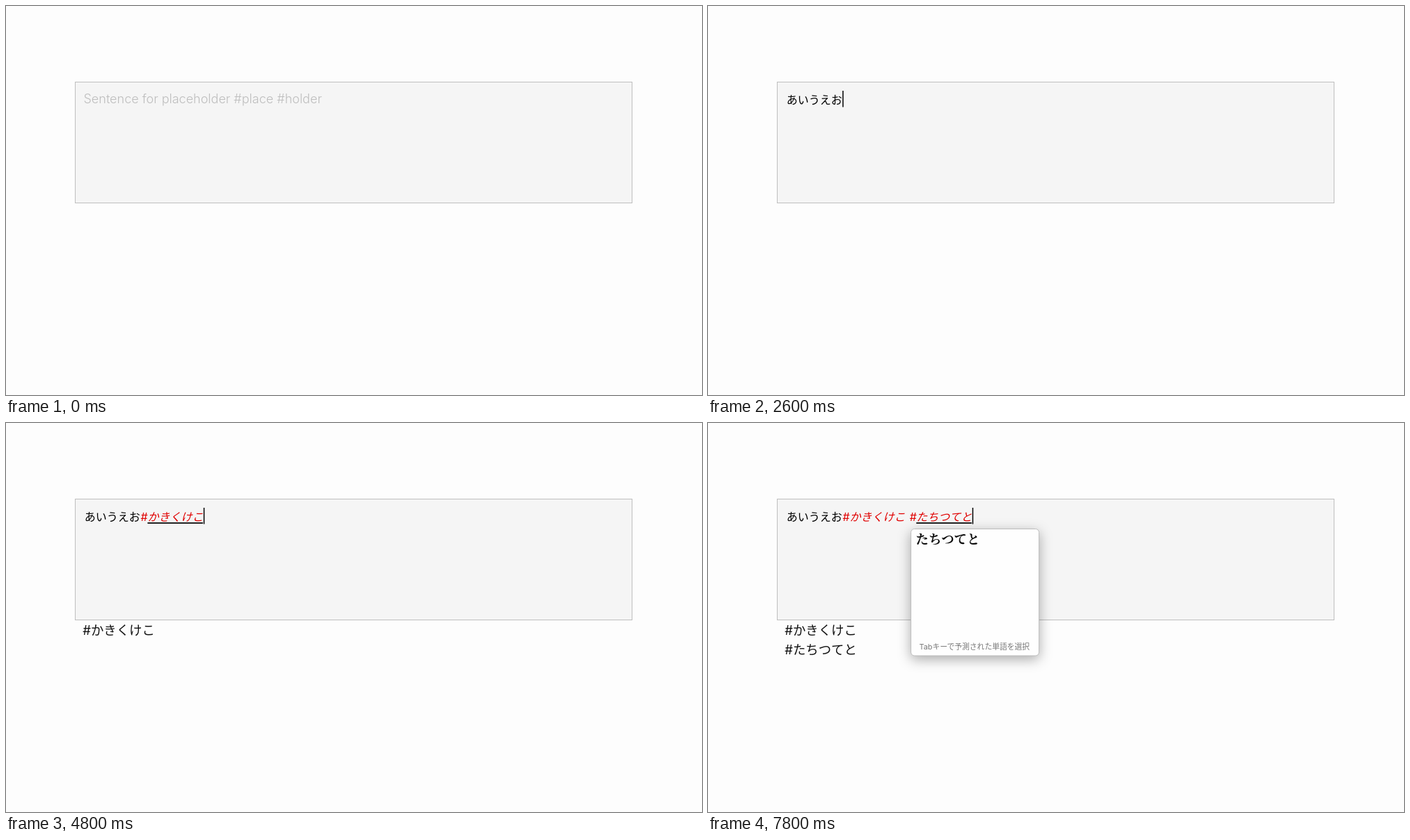
Write an HTML page that moves like this. It is 1000 px wide and 560 px high and loops after 8 s.

```html
<!DOCTYPE html>
<html lang="ja">
<head>
<meta charset="utf-8">
<title>Hashtag input</title>
<style>
  html, body { margin: 0; width: 100%; height: 100%; overflow: hidden; background: #fdfdfd; }
  svg { display: block; width: 1000px; height: 560px; }
  text { font-family: Inter, "Noto Sans CJK JP", "Noto Sans CJK", sans-serif; white-space: pre; }
  .hint { font-size: 18px; font-weight: 300; fill: #bebebe; }
  .typed { font-size: 16px; fill: #000; }
  .tag { font-style: italic; fill: #e00000; }
  .found { font-size: 18.4px; fill: #111; }
  .item { font: 700 18.4px "Noto Serif CJK JP", "Noto Serif CJK", "Noto Serif", "Noto Sans CJK JP", serif; fill: #0a0a0a; }
  .help { font-size: 10.8px; fill: #777; }
  .panel { fill: #fefefe; stroke: #bcbcbc; filter: drop-shadow(0 5px 9px rgba(0, 0, 0, .32)); }
</style>
</head>
<body>
<svg viewBox="0 0 1000 560">
  <rect width="1000" height="560" fill="#fdfdfd"/>
  <rect x="99.5" y="109.5" width="800" height="174" fill="#f5f5f5" stroke="#bebebe"/>
  <text id="hint" class="hint" x="111.5" y="139.5">Sentence for placeholder #place #holder</text>
  <g id="field"></g>
  <rect id="underline" y="143" height="2" fill="#222"/>
  <rect id="caret" y="122" width="1.5" height="23.5" fill="#000"/>
  <g id="found"></g>
  <g id="popup">
    <rect class="panel" x=".5" y="152.5" width="184" height="182.5" rx="5"/>
    <g id="items"></g>
    <text class="help" x="12.5" y="326.3">Tabキーで予測された単語を選択</text>
  </g>
</svg>
<script>
const LOOP = 8000, EM = 16, LEFT = 112.8, HASH = 10.1, GAP = 5.8;
const $ = id => document.getElementById(id);

const words = {
  a: ['ありがとう', 'ある', 'あと', 'あれ', 'あり'],
  ai: ['あいうえお', 'あいだ', '相手', 'アイス', '合図'],
  aiu: ['アイウエオ', 'あいうえお順', 'アイウエオ順', 'あいうえお作文', 'アイウエア'],
  ka: ['kaki'],
  ta: ['たねみち'],
  tachi: ['たちつてと']
};

const A = 'あいうえお', K = A + '#かきくけこ';
// start ms, text, composing, suggestions
const steps = [
  [0, null],
  [200, ''],
  [600, 'あ', true],
  [800, 'あ', true, 'a'],
  [1200, 'あい', true, 'ai'],
  [1600, 'あいう', true, 'aiu'],
  [1800, 'あいうえ', true, 'aiu'],
  [2000, A, true, 'aiu'],
  [2600, A],
  [3000, A + '#'],
  [3200, A + '#ｋ', true],
  [3400, A + '#か', true],
  [3600, A + '#かｋ', true],
  [3800, A + '#かき', true, 'ka'],
  [4000, A + '#かきｋ', true, 'ka'],
  [4200, A + '#かきく', true],
  [4400, A + '#かきくけ', true],
  [4600, A + '#かきくけｋ', true],
  [4800, K, true],
  [5000, K],
  [5200, K + ' '],
  [5600, K + ' #'],
  [6000, K + ' #ｔ', true],
  [6200, K + ' #た', true],
  [6400, K + ' #た', true, 'ta'],
  [6600, K + ' #たｔ', true, 'ta'],
  [6800, K + ' #たち', true, 'tachi'],
  [7000, K + ' #たちｔ', true, 'tachi'],
  [7200, K + ' #たちつ', true, 'tachi'],
  [7400, K + ' #たちつて', true, 'tachi'],
  [7600, K + ' #たちつてｔ', true, 'tachi'],
  [7800, K + ' #たちつてと', true, 'tachi']
];

function addText(parent, cls, x, y, str) {
  const el = document.createElementNS('http://www.w3.org/2000/svg', 'text');
  el.setAttribute('class', cls);
  el.setAttribute('x', x);
  el.setAttribute('y', y);
  el.textContent = str;
  parent.append(el);
}

const show = (el, on) => el.setAttribute('visibility', on ? 'visible' : 'hidden');

function draw([, text, composing, key]) {
  const field = $('field'), found = $('found'), items = $('items');
  for (const g of [field, found, items]) g.replaceChildren();
  show($('hint'), !text);
  show($('caret'), text !== null);

  // Lay out plain runs, spaces, hash signs and tag bodies in turn.
  let x = LEFT, start = LEFT, inTag = false;
  for (const run of (text || '').match(/#|\s|[^#\s]+/g) || []) {
    start = x;
    if (run === ' ') {
      x += GAP;
      inTag = false;
    } else if (run === '#') {
      x += HASH + (inTag ? 0 : .5) * (start < 200);
      addText(field, /#$/.test(text) && x > 200 && text.lastIndexOf('#') === text.length - 1 &&
        !(text.indexOf('#') < text.length - 1 && start < 200) ? 'typed' : 'typed tag', start + .4, 140.6, run);
      inTag = true;
    } else {
      addText(field, inTag ? 'typed tag' : 'typed', x, 140.6, run);
      x += EM * run.length;
    }
  }

  $('caret').setAttribute('x', x + .4);
  $('underline').setAttribute('x', start);
  $('underline').setAttribute('width', Math.max(0, x - start - .5));
  show($('underline'), composing);

  const tags = (text || '').match(/#[^#\s]+/g) || [];
  tags.forEach((tag, i) => addText(found, 'found', 110.3, 305 + 28 * i, tag));

  show($('popup'), key);
  $('popup').setAttribute('transform', `translate(${start - 8.2} 0)`);
  (words[key] || []).forEach((w, i) => addText(items, 'item', 7.5, 174.2 + 31.4 * i, w));
}

let current;
function tick() {
  const t = performance.now() % LOOP;
  const step = steps.findLast(s => s[0] <= t);
  if (step !== current) draw(current = step);
  requestAnimationFrame(tick);
}
tick();
</script>
</body>
</html>
```
